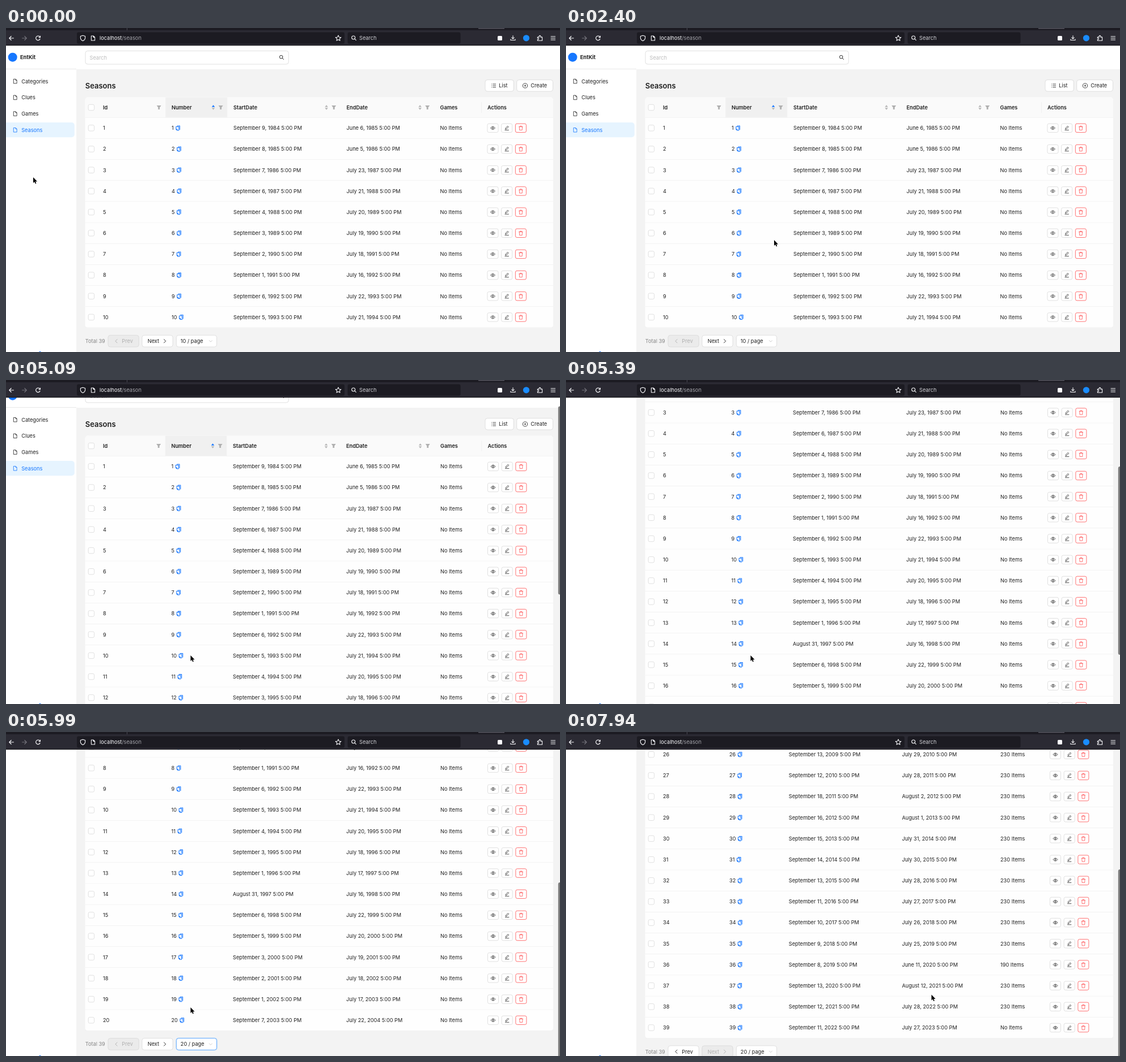
Animation, 977 px wide and 573 px high, one loop 8000 ms. Source, as an HTML page with a canvas:

```html
<!DOCTYPE html>
<html lang="en">
<head>
<meta charset="utf-8">
<title>Seasons</title>
<style>
html, body { margin: 0; width: 100%; height: 100%; overflow: hidden; background: #f3f3f3; }
canvas { display: block; width: 977px; height: 573px; }
</style>
</head>
<body>
<canvas id="stage"></canvas>
<script>
const W = 977, H = 573, LOOP = 8000;
const ROW = 37.17, ROW0 = 176.9;
const INK = 'rgba(0,0,0,.88)', BLUE = '#1677ff', RED = '#ff4d4f', LINE = '#d9d9d9', FAINT = 'rgba(0,0,0,.25)';
const FONT = 'Inter, Roboto, sans-serif';
const canvas = document.getElementById('stage');
const dpr = window.devicePixelRatio || 1;
canvas.width = W * dpr;
canvas.height = H * dpr;
const c = canvas.getContext('2d');

// Icons live in a 16 x 16 box
const ICON = {
  file: 'M3 1.5h6.5l3.5 3.5v9.5h-10zM9.5 1.5v3.5h3.5',
  search: 'M11.5 6.7a4.8 4.8 0 1 1-9.6 0a4.8 4.8 0 1 1 9.6 0M10.2 10.2l4.4 4.4',
  eye: 'M1 8q7-9.5 14 0q-7 9.5-14 0zM10.2 8a2.2 2.2 0 1 1-4.4 0a2.2 2.2 0 1 1 4.4 0',
  edit: 'M1.5 14.5h13M3.5 11.5l.7-3.2 6.6-6.6 2.5 2.5-6.6 6.6z',
  trash: 'M1.5 4h13M5.5 4v-2.3h5v2.3M3.3 4l.6 10.5h8.2l.6-10.5',
  list: 'M5 3h10M5 8h10M5 13h10M1 3h1.6M1 8h1.6M1 13h1.6',
  plus: 'M15 8a7 7 0 1 1-14 0a7 7 0 1 1 14 0M8 5v6M5 8h6',
  copy: 'M5 1.5h8.3v11.5M2.5 4h8v10.7h-5l-3-3zM2.7 11.5h3v3',
  left: 'M11 2l-6 6 6 6',
  right: 'M5 2l6 6-6 6',
  down: 'M2 5l6 6 6-6',
  back: 'M15 8h-13M8 2l-6 6 6 6',
  forward: 'M1 8h13M8 2l6 6-6 6',
  reload: 'M13.5 9.5a5.8 5.8 0 1 1-1.2-5.6l1.7 1.8M14 1.5v4.3h-4.3',
  shield: 'M8 1l6 2v4q0 5.500-6 8q-6-2.500-6-8v-4z',
  page: 'M3 1.500h6l4 4v9h-10zM9 1.500v4h4',
  star: 'M8 1l2.1 4.6 5 .6-3.700 3.400 1 4.900-4.400-2.500-4.400 2.500 1-4.900-3.700-3.400 5-.6z',
  save: 'M8 1v9M4 6.500l4 4 4-4M1.500 11v3.500h13v-3.500',
  piece: 'M2 6h4v-2a2 2 0 0 1 4 0v2h4v9h-12v-3h1.500a1.600 1.600 0 0 0 0-3.200h-1.500z',
  menu: 'M1 3h14M1 8h14M1 13h14'
};
const path = {};
for (const k in ICON) path[k] = new Path2D(ICON[k]);
const ARROW = new Path2D('M0 0V10L2.300 8L3.800 11.400L5.400 10.700L3.900 7.400H7.100Z');
const HAND = new Path2D('M-1 .8q0-1.300 1-1.300t1 1.300v3.400l4 .8q1.500.4 1.400 2l-.6 3.200-.8 1.800h-5l-3.400-4.800q-.6-1.600 1.100-1.200l1.300 1.200z');

// Month letter and day for each season
const STARTS = ('S9 S8 S7 S6 S4 S3 S2 S1 S6 S5 S4 S3 S1 A31 S6 S5 S3 S2 S1 S7 ' +
  'S6 S12 S11 S10 S8 S13 S12 S18 S16 S15 S14 S13 S11 S10 S9 S8 S13 S12 S11').split(' ');
const ENDS = ('N6 N5 J23 J21 J20 J19 J18 J16 J22 J21 J20 J18 J17 J16 J22 J20 J19 J18 J17 J22 ' +
  'J22 J28 J27 J25 J31 J29 J28 A2 A1 J31 J30 J28 J27 J26 J25 N11 A12 J28 J27').split(' ');
const MONTH = { S: 'September', A: 'August', N: 'June', J: 'July' };
const date = (code, year) => `${MONTH[code[0]]} ${code.slice(1)}, ${year} 5:00 PM`;
const games = n => n < 26 || n === 39 ? 'No Items' : n === 36 ? '190 Items' : '230 Items';

// Column positions: number, start, end, games, first action
const COLS = {
  ten: [292, 401, 600.5, 765.5, 849],
  twenty: [291.5, 400, 600, 766, 849.5],
  last: [288, 392.8, 592.4, 766, 853.5]
};

const POINTER = [
  [0, 48, 264], [450, 48, 264], [750, 66, 305], [900, 66, 305], [1200, 356, 381], [2250, 356, 381],
  [2400, 367, 375], [2550, 541, 357], [2700, 420, 440], [2850, 297, 526], [3000, 297, 526],
  [3150, 326, 552], [3450, 326, 552], [3600, 330, 530], [3900, 332, 527], [4050, 328, 505.5],
  [4200, 326, 487], [4350, 325.5, 487], [6290, 325.5, 487], [6590, 288, 584], [6890, 282, 580],
  [7040, 275, 563], [7640, 275, 563], [7940, 644.5, 464.5]
];
const SCROLL = [
  [4790, 0], [5090, 24], [5240, 96], [5390, 193.7], [5540, 264], [5690, 318], [5840, 356],
  [5990, 373.4], [6140, 368], [6290, 363.5], [6440, 361], [6590, 360.1]
];

function along(keys, t) {
  if (t <= keys[0][0]) return keys[0].slice(1);
  for (let i = 1; i < keys.length; i++) {
    const a = keys[i - 1], b = keys[i];
    if (t <= b[0]) {
      const p = (t - a[0]) / (b[0] - a[0]);
      return a.slice(1).map((v, k) => v + (b[k + 1] - v) * p);
    }
  }
  return keys[keys.length - 1].slice(1);
}
const clamp = v => Math.max(0, Math.min(1, v));
const within = (t, a, b) => t >= a && t < b;

function text(s, x, y, color = INK, weight = 400, size = 9.2) {
  c.font = `${weight} ${size}px ${FONT}`;
  c.fillStyle = color;
  c.fillText(s, x, y + size * .36);
  return c.measureText(s).width;
}
function rect(x, y, w, h, color) {
  c.fillStyle = color;
  c.fillRect(x, y, w, h);
}
function box(x, y, w, h, r, fill, stroke, line = .8) {
  c.beginPath();
  c.roundRect(x, y, w, h, r);
  if (fill) { c.fillStyle = fill; c.fill(); }
  if (stroke) { c.strokeStyle = stroke; c.lineWidth = line; c.stroke(); }
}
function dot(x, y, r, color) {
  c.beginPath();
  c.arc(x, y, r, 0, 7);
  c.fillStyle = color;
  c.fill();
}
function icon(name, x, y, color = INK, size = 9.3, line = 1.4) {
  c.save();
  c.translate(x - size / 2, y - size / 2);
  c.scale(size / 16, size / 16);
  c.strokeStyle = color;
  c.lineWidth = line;
  c.lineJoin = 'round';
  c.stroke(path[name]);
  c.restore();
}
function shape(points, color) {
  c.beginPath();
  points.forEach(([x, y]) => c.lineTo(x, y));
  c.fillStyle = color;
  c.fill();
}

function toolbar() {
  const light = '#fbfbfe';
  rect(0, 0, W, 31, '#2b2a33');
  rect(0, 0, W, 4, '#1c1b22');
  rect(213, 0, 1, 4, '#4a4953');
  rect(833, 0, 46, 1.5, '#55545e');
  rect(0, 30.3, W, .9, '#0c0c0d');
  box(125, 7.5, 472, 20.5, 3, '#1c1b22');
  box(602.5, 7.5, 199, 20.5, 3, '#1c1b22');
  icon('back', 9.5, 18, light, 10, 1.8);
  icon('forward', 32.5, 18, '#75747c', 10, 1.8);
  icon('reload', 56.5, 18, light, 10.5, 1.8);
  icon('shield', 135.5, 18, light, 11, 1.6);
  icon('page', 153.5, 18, light, 10, 1.7);
  const w = text('localhost', 165, 18, light);
  text('/season', 165 + w, 18, '#a5a5ab');
  icon('star', 586, 17.8, light, 11, 1.5);
  icon('search', 613.500, 17.8, light, 10, 1.700);
  text('Search', 623, 18, '#d0d0d5');
  box(867, 14, 8, 8, 1.5, light);
  icon('save', 894, 17.500, light, 10, 1.700);
  dot(917.5, 17.8, 5.6, '#1a8cff');
  icon('piece', 941.500, 17.500, light, 11, 1.600);
  icon('menu', 964.800, 18, light, 9.500, 1.800);
}

function pageTop() {
  rect(0, 31, W, 42, '#fff');
  rect(0, 72, 124, .8, '#e3e3e3');
  dot(11.7, 51.7, 8, BLUE);
  text('EntKit', 25, 52, INK, 700);
  box(140, 40.5, 358.3, 23.5, 4, '#fff', LINE);
  text('Search', 147.5, 52.3, '#bdbdbd');
  icon('search', 486, 52, INK, 9.3, 1.7);
  ['Categories', 'Clues', 'Games', 'Seasons'].forEach((name, i) => {
    const y = 94.2 + i * 28.7, on = i === 3;
    if (on) box(-6, y - 13.2, 126.8, 26.2, 5, '#e6f4ff');
    icon('file', 16.2, y, on ? BLUE : INK);
    text(name, 27.2, y, on ? BLUE : INK);
  });
  text('Seasons', 139.700, 102, INK, 600, 13);
  box(845, 91.7, 50.4, 20.3, 4, '#fff', LINE);
  icon('list', 860, 102);
  text('List', 869.3, 102);
  box(900.7, 91.7, 63.8, 20.3, 4, '#fff', LINE);
  icon('plus', 915.5, 102);
  text('Create', 925.3, 102);
}

function sorter(x, y, up) {
  shape([[x - 2.8, y - .7], [x + 2.8, y - .7], [x, y - 4.3]], up ? BLUE : '#b5b5b5');
  shape([[x - 2.8, y + .7], [x + 2.8, y + .7], [x, y + 4.3]], '#b5b5b5');
}
function funnel(x, y) {
  shape([[x - 4, y - 3.6], [x + 4, y - 3.6], [x + 1.4, y], [x + 1.4, y + 3.6], [x - 1.4, y + 3.6], [x - 1.4, y]], '#b0b0b0');
}
const check = y => box(145.2, y - 5.2, 10.4, 10.4, 2.4, '#fff', LINE);

function tableHead(x) {
  const y = 140.5;
  box(139.6, 122.6, 825.4, 36, [5, 5, 0, 0], '#fafafa');
  rect(x[0] - 10.7, 122.6, x[1] - x[0], 35.6, '#f0f0f0');
  rect(139.6, 157.9, 825.4, .7, '#f0f0f0');
  rect(x[4] - 11, 131, .7, 19, '#ebebeb');
  check(y);
  text('Id', 171, y, INK, 600);
  ['Number', 'StartDate', 'EndDate', 'Games', 'Actions'].forEach((s, i) => text(s, x[i], y, INK, 600));
  x.slice(0, 4).forEach((v, i) => {
    funnel(v - 22.3, y);
    if (i) sorter(v - 35.4, y, i === 1);
  });
}

function action(name, x, y, color, border) {
  box(x, y - 7.7, 19, 15.4, 2.6, '#fff', border);
  icon(name, x + 9.5, y, color, 9);
}
function tableRow(n, y, x) {
  rect(139.6, y + 18.1, 825.4, .7, '#efefef');
  check(y);
  text(n, 171, y);
  const w = text(n, x[0], y);
  icon('copy', x[0] + w + 7.5, y, BLUE, 9.8, 1.7);
  text(date(STARTS[n - 1], 1983 + n), x[1], y);
  text(date(ENDS[n - 1], 1984 + n), x[2], y);
  text(games(n), x[3], y);
  action('eye', x[4], y, INK, LINE);
  action('edit', x[4] + 24.7, y, INK, LINE);
  action('trash', x[4] + 49.4, y, RED, RED);
}

function pager(y, t) {
  const onLast = t >= 7190, focus = within(t, 3300, 7190), open = within(t, 3300, 4350);
  const button = (x, off, hover) => {
    box(x, y - 10.4, 54.3, 20.7, 4, off ? '#ebebeb' : '#fff', hover ? '#4096ff' : LINE);
    return off ? FAINT : hover ? '#4096ff' : INK;
  };
  text('Total 39', 139.7, y, 'rgba(0,0,0,.45)');
  let color = button(180, !onLast);
  icon('left', 194.6, y, color, 9, 1.7);
  text('Prev', 204.3, y, color);
  color = button(239.9, onLast, within(t, 7040, 7190));
  text('Next', 249.800, y, color);
  icon('right', 280, y, color, 9, 1.700);
  if (focus) box(299.2, y - 11.6, 73.8, 23.1, 5, 'rgba(5,145,255,.12)');
  box(300.4, y - 10.4, 71.2, 20.7, 4, '#fff', focus || within(t, 3150, 3300) ? '#4096ff' : LINE);
  text((t < 4350 ? 10 : 20) + ' / page', 307.800, y, open ? FAINT : INK);
  icon('down', 361, y, FAINT, 7.500, 1.700);
}

function dropdown(t) {
  const p = Math.min(clamp((t - 3300) / 200), clamp(1 - (t - 4300) / 200));
  if (!p) return;
  c.save();
  c.globalAlpha = p;
  c.translate(0, 541);
  c.scale(1, .8 + .2 * p);
  c.translate(0, -541);
  c.shadowColor = 'rgba(0,0,0,.13)';
  c.shadowBlur = 16 * dpr;
  c.shadowOffsetY = 3 * dpr;
  box(300.4, 452, 71.6, 89, 5, '#fff');
  c.shadowColor = 'transparent';
  const active = t < 3600 ? 0 : t < 4200 ? 3 : 1;
  [10, 20, 50, 100].forEach((n, i) => {
    const y = 465.2 + i * 20.9;
    if (!i || i === active) box(303, y - 10.4, 66.5, 20.7, 3, i ? '#f5f5f5' : '#e6f4ff');
    text(n + ' / page', 310.3, y, INK, i ? 400 : 600);
  });
  c.restore();
}

function scrollbar(top, onLast) {
  const ratio = onLast ? .655 : .628;
  box(973.8, 31.4 + top * ratio, 6, onLast ? 347 : 333, 3, '#7d7d7d');
}

function pointer(t) {
  const [x, y] = along(POINTER, t);
  const hand = within(t, 3150, 4350) || within(t, 7040, 7700);
  c.save();
  c.translate(x, y);
  c.lineJoin = 'round';
  c.strokeStyle = hand ? '#000' : '#fff';
  c.fillStyle = hand ? '#fff' : '#000';
  c.lineWidth = hand ? 1 : 1.4;
  c.stroke(hand ? HAND : ARROW);
  c.fill(hand ? HAND : ARROW);
  c.restore();
}

function draw(t) {
  const many = t >= 4640, onLast = t >= 7340;
  const x = onLast ? COLS.last : many ? COLS.twenty : COLS.ten;
  const first = onLast ? 21 : 1, count = onLast ? 19 : many ? 20 : 10;
  const top = onLast ? 323 : along(SCROLL, t)[0];
  const end = ROW0 + (count - 1) * ROW;

  c.setTransform(dpr, 0, 0, dpr, 0, 0);
  rect(0, 0, W, H, '#f3f3f3');
  rect(0, 31, 124, H, '#fff');
  c.save();
  c.translate(0, -top);
  pageTop();
  box(139.6, 122.6, 825.4, end + 18.8 - 122.6, 5, '#fefefe');
  tableHead(x);
  for (let i = 0; i < count; i++) {
    const y = ROW0 + i * ROW;
    if (y - top > 0 && y - top < H + 20) tableRow(first + i, y, x);
  }
  pager(end + 42.3, t);
  c.restore();
  dropdown(t);
  rect(58.5, 572, 3, 1, BLUE);
  if (many) scrollbar(top, onLast);
  toolbar();
  pointer(t);
}

function tick(t) {
  const lag = t < 4640 ? 0 : 10;
  return Math.floor((t + lag) / 150) * 150 - lag;
}
const start = performance.now();
function frame() {
  draw(tick((performance.now() - start) % LOOP));
  requestAnimationFrame(frame);
}
frame();
</script>
</body>
</html>
```
